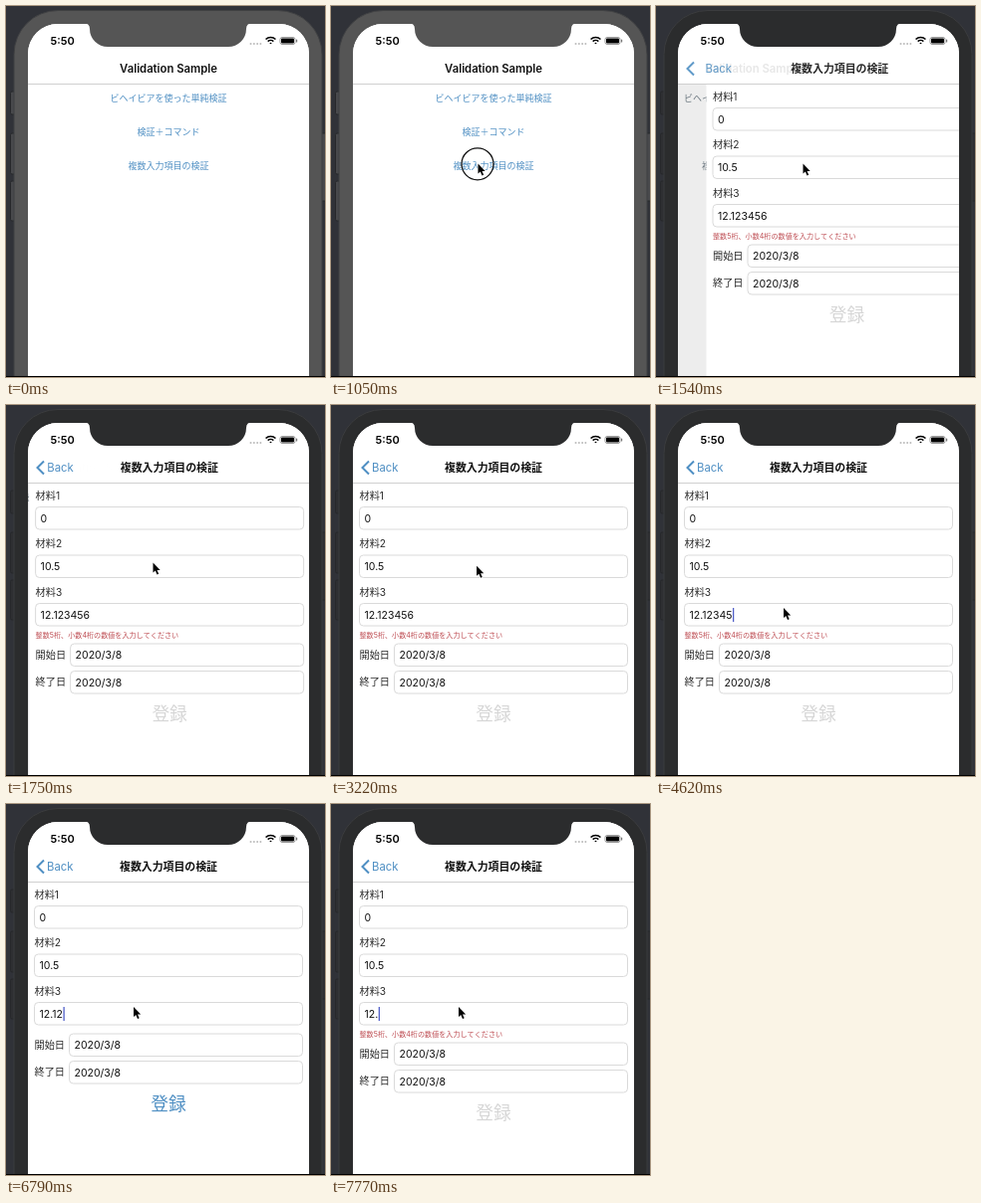
An HTML page with a canvas that plays this animation: 320 by 373 pixels, repeating every 8 s.

```html
<!DOCTYPE html>
<html lang="ja">
<meta charset="utf-8">
<title>Validation Sample</title>
<style>
  html, body { margin: 0; width: 320px; height: 373px; overflow: hidden; background: #303238; }
  canvas { display: block; }
</style>
<canvas id="stage" width="320" height="373"></canvas>
<script>
const ctx = document.getElementById('stage').getContext('2d');
const LOOP = 8000, BLUE = '#4f8fc3', INK = '#2b2b2b';
const FONT = 'Inter, "Noto Sans CJK JP", sans-serif';

// The phone darkens once its window takes the focus
const FOCUS = 1120;
const IDLE = { bezel: '#555555', edge: '#3f4042', button: '#48494c' };
const ACTIVE = { bezel: '#2b2c2d', edge: '#3b3c3e', button: '#2e2f32' };

// [time, content of the third field]
const KEYS = [
  [3990, '12.123456'], [4200, '12.123456'], [4620, '12.12345'], [4970, '12.1234'],
  [5320, '12.123'], [6790, '12.12'], [7280, '12.1'], [7770, '12.']
];

const clamp = v => Math.min(1, Math.max(0, v));
const mix = (a, b, p) => a + (b - a) * p;
const smooth = (t, from, to) => { const p = clamp((t - from) / (to - from)); return p * p * (3 - 2 * p); };
const within = (t, from, to) => t >= from && t < to;

function text(str, x, middle, size, color = INK, weight = 400, align = 'left') {
  ctx.font = `${weight} ${size}px ${FONT}`;
  ctx.fillStyle = color;
  ctx.textAlign = align;
  ctx.fillText(str, x, middle + size * 0.37);
}

function box(x, y, w, h, r, fill, stroke) {
  ctx.beginPath();
  ctx.roundRect(x, y, w, h, r);
  if (fill) { ctx.fillStyle = fill; ctx.fill(); }
  if (stroke) { ctx.strokeStyle = stroke; ctx.lineWidth = 1; ctx.stroke(); }
}

function faded(alpha, draw) {
  ctx.save();
  ctx.globalAlpha *= clamp(alpha);
  draw();
  ctx.restore();
}

function field(value, x, y) {
  box(x, y, 297.5 - x, 22.5, 4, '#fff', '#dadada');
  text(value, x + 5, y + 11.5, 10.5, '#111');
}

// Share of the page push still to go: a critically damped spring
function pushLeft(t) {
  if (t < 1328) return 1;
  if (t > 1960) return 0;
  const k = 0.0182 * (t - 1328);
  return (1 + k) * Math.exp(-k);
}

function menu(moving) {
  const color = moving ? '#74808a' : BLUE;
  ['ビヘイビアを使った単純検証', '検証＋コマンド', '複数入力項目の検証']
    .forEach((s, i) => text(s, 163, 93 + 34 * i, 9, color, 400, 'center'));
}

function form(t) {
  const key = KEYS.findLast(k => t >= k[0]);
  const value = key ? key[1] : '12.123456';
  const valid = within(t, 4970, 7770);

  ['0', '10.5', value].forEach((v, i) => {
    text('材料' + (i + 1), 28.5, 91 + 48.5 * i, 10.2);
    field(v, 28.5, 102.5 + 48.5 * i);
  });
  if (key) {
    const idle = t - key[0];
    ctx.font = `400 10.5px ${FONT}`;
    const x = 34 + ctx.measureText(value).width;
    faded(1 - clamp((idle - 490) / 210) + clamp((idle - 980) / 210), () => {
      ctx.fillStyle = '#5361c9';
      ctx.fillRect(x, 204, 1.3, 14);
    });
  }

  if (!valid) text('整数5桁、小数4桁の数値を入力してください', 28.5, 231, 7.1, '#bd4a50');
  // Without the message the rows below close up
  const top = valid ? 231 : 240;
  ['開始日', '終了日'].forEach((s, i) => {
    text(s, 28.5, top + 11 + 27.5 * i, 10.2);
    field('2020/3/8', 63.5, top + 27.5 * i);
  });
  text('登録', 163, top + 70, 17.7, valid ? BLUE : '#d6d6d6', 400, 'center');
}

function navBar(left) {
  ctx.fillStyle = '#fff';
  ctx.fillRect(22, 18, 282, 60);
  ctx.fillStyle = '#d0d0d0';
  ctx.fillRect(22, 78, 282, 1);
  faded(left, () =>
    text('Validation Sample', 163 - 72 * (1 - left), 63, 11.3, '#111', 600, 'center'));
  faded(1 - left, () => {
    text('複数入力項目の検証', 163 + 210 * left, 63, 10.9, '#111', 700, 'center');
    text('Back', 41 + 85 * left, 63, 11.3, BLUE);
    ctx.beginPath();
    ctx.moveTo(38, 56.5);
    ctx.lineTo(31.5, 63);
    ctx.lineTo(38, 69.5);
    ctx.strokeStyle = BLUE;
    ctx.lineWidth = 2;
    ctx.stroke();
  });
}

function statusBar() {
  text('5:50', 44.5, 35, 11, '#000', 600);
  for (let i = 0; i < 4; i++) box(244.5 + 3.3 * i, 37, 2, 2, 1, '#bbb');
  ctx.strokeStyle = '#000';
  ctx.lineWidth = 1.6;
  for (const r of [1, 4, 7]) {
    ctx.beginPath();
    ctx.arc(265.5, 38.5, r, -Math.PI * 0.75, -Math.PI * 0.25);
    ctx.stroke();
  }
  box(275, 31.5, 15, 7, 2, null, '#999');
  box(276, 32.5, 13, 5, 1, '#000');
  box(291, 33.5, 1.2, 3, 0.6, '#777');
}

function phoneBody(skin) {
  ctx.fillStyle = '#303238';
  ctx.fillRect(0, 0, 320, 373);
  for (const [x, y, h] of [[4.5, 86, 23], [4.5, 128, 41], [4.5, 176, 40], [316, 128, 68]])
    box(x, y, 5, h, 1.5, skin.button, '#27282b');
  box(8, 4.5, 309, 440, 44, skin.bezel, skin.edge);
}

function notch(skin) {
  ctx.beginPath();
  ctx.moveTo(78, 17);
  ctx.quadraticCurveTo(84, 17.5, 84, 23);
  ctx.arcTo(84, 41, 104, 41, 18);
  ctx.arcTo(241, 41, 241, 23, 18);
  ctx.lineTo(241, 23);
  ctx.quadraticCurveTo(241, 17.5, 247, 17);
  ctx.fillStyle = skin.bezel;
  ctx.fill();
}

function pointer(t) {
  if (t < 420) return;
  const a = smooth(t, 330, 840), b = smooth(t, 3110, 3780);
  const bend = (p0, p1, p2) => mix(mix(p0, p1, a), mix(p1, p2, a), a);
  const x = mix(bend(161, 132, 147.5), 128, b);
  const y = mix(bend(341, 235, 158.5), 204, b);
  if (within(t, 1050, 1190) || within(t, 3780, 3920)) {
    ctx.beginPath();
    ctx.arc(x - 0.5, y + 0.3, 16, 0, 7);
    ctx.strokeStyle = '#111';
    ctx.lineWidth = 1.3;
    ctx.stroke();
  }
  ctx.save();
  ctx.translate(x, y);
  ctx.lineJoin = 'round';
  const arrow = new Path2D('M0 0V10L2.3 8L4 12L5.7 11.2L4 7.4H7.2Z');
  ctx.strokeStyle = '#fff';
  ctx.lineWidth = 1.4;
  ctx.stroke(arrow);
  ctx.fillStyle = '#000';
  ctx.fill(arrow);
  ctx.restore();
}

function draw(t) {
  const left = pushLeft(t);
  const skin = t < FOCUS ? IDLE : ACTIVE;
  phoneBody(skin);

  ctx.save();
  box(22, 18, 282, 400, 30, '#fff');
  ctx.clip();
  if (left > 0) {
    ctx.save();
    ctx.translate(-85 * (1 - left), 0);
    menu(left < 1);
    ctx.restore();
    ctx.fillStyle = `rgba(0,0,0,${0.08 * (1 - left)})`;
    ctx.fillRect(22, 78, 282, 300);
  }
  if (left < 1) {
    ctx.save();
    ctx.translate(282 * left, 0);
    ctx.fillStyle = '#fff';
    ctx.fillRect(22, 78, 282, 300);
    form(t);
    ctx.restore();
  }
  navBar(left);
  statusBar();
  ctx.restore();

  notch(skin);
  ctx.fillStyle = '#000';
  ctx.fillRect(0, 372, 320, 1);
  pointer(t);
}

function tick() {
  draw(performance.now() % LOOP);
  requestAnimationFrame(tick);
}
tick();
</script>
</html>
```
